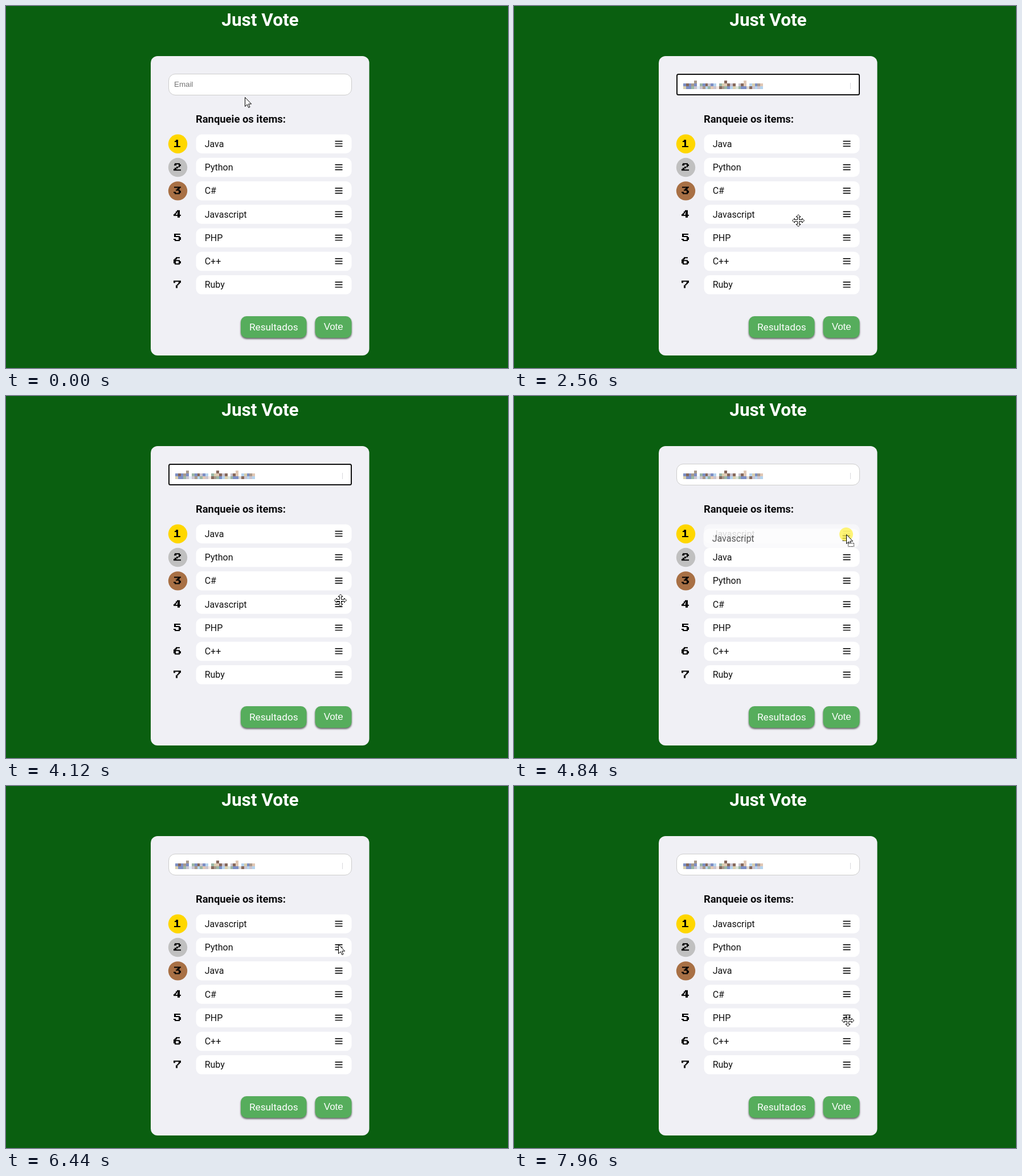
An HTML page for the animation above (8000 ms loop, 881 px wide and 636 px high).

```html
<!DOCTYPE html>
<html lang="pt">
<head>
<meta charset="utf-8">
<title>Just Vote</title>
<style>
html, body { margin: 0; width: 100%; height: 100%; overflow: hidden; background: #0a5f10; }
svg { display: block; position: absolute; left: 0; top: 0; font-family: Roboto, sans-serif; }
.arial { font-family: "Liberation Sans", sans-serif; }
.btn { fill: #56ad5c; filter: drop-shadow(0 2px 1.5px rgba(0,0,0,.6)); }
.sharp { shape-rendering: crispEdges; }
.pointer path { fill: #fff; stroke: #000; stroke-width: 1; }
</style>
</head>
<body>
<svg id="stage" width="881" height="636" viewBox="0 0 881 636">
  <text x="446" y="34.5" font-size="31.5" font-weight="700" fill="#fff" text-anchor="middle">Just Vote</text>
  <rect x="254" y="88" width="383.5" height="526" rx="12" fill="#f0f0f5"/>
  <rect id="field" fill="#fff"/>
  <text id="hint" class="arial" x="295" y="142" font-size="13.33" fill="#757575">Email</text>
  <rect id="caret" class="sharp" x="295" y="130" width="1" height="15"/>
  <g id="mosaic" class="sharp"></g>
  <text x="333" y="205" font-size="18.4" font-weight="700" fill="#0b0b0d">Ranqueie os items:</text>
  <g id="ranks"></g>
  <g id="rows"></g>
  <rect class="btn" x="412" y="545" width="115.5" height="38" rx="10"/>
  <text x="469.8" y="570" font-size="17.2" fill="#fff" text-anchor="middle">Resultados</text>
  <rect class="btn" x="542.5" y="545" width="64" height="38" rx="10"/>
  <text class="arial" x="574.8" y="569" font-size="17" fill="#fff" text-anchor="middle">Vote</text>
  <g id="ghost"></g>
  <circle id="press" r="12" fill="#fff02e" fill-opacity=".65"/>
  <g class="pointer">
    <path id="arrow" d="M.5 .5v16l3.7-3.5 2.5 5.5 2.3-1-2.4-5.4h5z"/>
    <path id="beam" d="M-3 -7.5h2.5l.5 .5 .5-.5h2.5M0-7V7M-3 7.5h2.5l.5-.5 .5 .5h2.5" style="fill:none"/>
    <path id="move" d="M0-10.5l4 4H1.5v5h5V-4l4 4-4 4V1.5h-5v5H4l-4 4-4-4h2.5v-5h-5V4l-4-4 4-4v2.5h5v-5H-4z"/>
    <path id="drop" d="M3.5 15.5h10v6h-10z" stroke-dasharray="1.5 1"/>
  </g>
</svg>
<script>
const LOOP = 8000, TOP = 242.3, PITCH = 41.27;
const $ = id => document.getElementById(id);
const names = ["Java", "Python", "C#", "Javascript", "PHP", "C++", "Ruby"];
const medals = ["#ffd700", "#c0c0c0", "#a87045"];
const digits = [
  "M2 2h2V0h4v11h4v2H1v-2h4V4H2z",
  "M2 0h9v2h2v3h-2v2h-3v2h-3v2h8v2H0v-3h2v-2h3v-2h4V2H5v2H1V2h1z",
  "M1 0h12v2h-2v2h-2v1h2v2h2v4h-2v2H2v-2H0V9h4v2h5V7H4V5h2V3h2V2H1z",
  "M6 0h5v8h2v2h-2v3H7v-3H0V7h2V5h2V2h2zM7 3v5H4V6h2V3z",
  "M1 0h11v2H4v2h7v2h2v5h-2v2H2v-2H0V9h4v2h5V6H1z",
  "M4 0h7v2H6v2H4v1h7v2h2v4h-2v2H2v-2H0V4h2V2h2zM4 7v4h5V7z",
  "M0 0h13v4h-2v2h-2v2h-2v5H4V8h2V6h2V4h1V2H3v2H0z"
];

// time, x, y, pointer shape from that time on
const path = [
  [0, 419, 160, "arrow"], [40, 419, 160, "arrow"], [240, 402, 153, "beam"], [440, 379, 144, "beam"],
  [1920, 379, 144, "beam"], [2120, 398, 190, "arrow"], [2240, 420, 260, "move"], [2480, 475, 421, "move"],
  [2720, 548, 290, "move"], [3200, 583, 283, "move"], [3400, 583, 283, "move"], [3800, 593, 345, "move"],
  [4120, 587, 359, "move"], [4240, 584, 359, "move"], [4320, 584, 359, "drop"], [4760, 583, 243, "drop"],
  [5040, 583, 243, "arrow"], [5200, 589, 262, "move"], [5360, 591, 290, "move"], [5600, 583, 322, "move"],
  [6040, 583, 322, "drop"], [6320, 583, 278, "drop"], [6400, 583, 278, "arrow"], [6480, 583, 278, "arrow"],
  [6840, 580, 334, "arrow"], [7000, 580, 345, "arrow"], [7200, 580, 345, "arrow"], [7320, 583, 368, "move"],
  [7600, 588, 439, "move"], [7960, 586, 412, "move"], [8000, 586, 412, "move"]
];
const presses = [[320, 440], [4280, 5040], [5760, 6400]];
const drags = [
  { item: "Javascript", from: 3, start: 4320, end: 5040, x: 584, y: 359 },
  { item: "Python", from: 2, start: 6080, end: 6400, x: 583, y: 322 }
];
const blinks = [[400, 920], [1480, 1800], [1960, 2400], [2860, 3440]];

const within = (t, spans) => spans.some(([a, b]) => t >= a && t < b);
const show = (node, on) => node.style.display = on ? "" : "none";
const place = (node, x, y) => node.setAttribute("transform", `translate(${x} ${y})`);
const slotY = i => TOP + i * PITCH;

function add(parent, tag, attrs, text) {
  const node = document.createElementNS("http://www.w3.org/2000/svg", tag);
  for (const k in attrs) node.setAttribute(k, attrs[k]);
  if (text) node.textContent = text;
  return parent.appendChild(node);
}

function makeRow(parent, name) {
  const g = add(parent, "g", {});
  add(g, "rect", { x: 333.5, y: -16.8, width: 273, height: 33.5, rx: 10, fill: "#fff" });
  add(g, "text", { x: 348.7, y: 5.5, "font-size": 16, fill: "#111" }, name);
  add(g, "path", { d: "M577.5-4.7h13M577.5-.3h13M577.5 4.1h13", stroke: "#111", "stroke-width": 1.7 });
  return g;
}

function makeMosaic() {
  const tints = ["#b5d3ee", "#a99a8c", "#d9cfae", "#7d8fc4", "#c9c3cf", "#9bb7a6", "#86695c", "#e0c7b4"];
  const tall = [4, 15, 22], gaps = [5, 12, 19, 23];
  const w = 4.83;
  let seed = 11;
  const rnd = () => (seed = seed * 16807 % 2147483647) / 2147483647;
  for (let c = 0; c < 29; c++) for (let r = 0; r < 3; r++) {
    const fill = tints[Math.floor(rnd() * tints.length)];
    const empty = r ? gaps.includes(c) && r === 1 : !tall.includes(c);
    if (!empty) add($("mosaic"), "rect", { x: 297 + c * w, y: 131 + r * 5, width: w, height: 5, fill, opacity: gaps.includes(c) ? .4 : 1 });
  }
  add($("mosaic"), "rect", { x: 590, y: 135, width: 1, height: 11, fill: "#d8d8dc" });
}

digits.forEach((d, i) => {
  const g = add($("ranks"), "g", {});
  place(g, 301.5, slotY(i));
  if (medals[i]) add(g, "circle", { r: 16.7, fill: medals[i] });
  add(g, "path", { d, transform: "translate(-7.5 -7.3)", "fill-rule": "evenodd" });
});
const rows = {}, ghosts = {};
names.forEach(n => rows[n] = makeRow($("rows"), n));
drags.forEach(d => {
  ghosts[d.item] = makeRow($("ghost"), d.item);
  ghosts[d.item].setAttribute("opacity", .7);
});
makeMosaic();

function pointerAt(t) {
  let i = path.length - 2;
  while (path[i][0] > t) i--;
  const [t0, x0, y0, kind] = path[i], [t1, x1, y1] = path[i + 1];
  const k = (t - t0) / (t1 - t0);
  return { x: x0 + (x1 - x0) * k, y: y0 + (y1 - y0) * k, kind };
}

function drawField(t) {
  const focus = t >= 400 && t < 4280, filled = t >= 1800;
  const box = focus
    ? { x: 286, y: 120, width: 320, height: 36, rx: 2.5, stroke: "#101010", "stroke-width": 2 }
    : { x: 285.5, y: 119.5, width: 321, height: 37, rx: 11.5, stroke: "#ccc", "stroke-width": 1 };
  for (const k in box) $("field").setAttribute(k, box[k]);
  show($("hint"), !filled);
  show($("mosaic"), filled);
  show($("caret"), within(t, blinks));
  $("caret").setAttribute("x", filled ? 433 : 295);
  $("caret").setAttribute("height", filled ? 1 : 15);
}

function drawList(t, p) {
  const order = names.slice();
  for (const d of drags) {
    const active = t >= d.start && t < d.end;
    if (t >= d.start) {
      const y = active ? p.y : pointerAt(d.end - 1).y;
      const to = Math.min(d.from, Math.max(0, Math.round((y - TOP) / PITCH)));
      order.splice(order.indexOf(d.item), 1);
      order.splice(to, 0, d.item);
    }
    show(ghosts[d.item], active);
    place(ghosts[d.item], p.x - d.x, slotY(d.from) + p.y - d.y);
    rows[d.item].setAttribute("opacity", active ? .5 : 1);
  }
  order.forEach((n, i) => place(rows[n], 0, slotY(i)));
}

function drawPointer(t, p) {
  const x = Math.round(p.x), y = Math.round(p.y);
  for (const id of ["arrow", "beam", "move", "drop"]) {
    show($(id), id === p.kind || (id === "arrow" && p.kind === "drop"));
    place($(id), x, y);
  }
  show($("press"), within(t, presses));
  place($("press"), x, y);
}

function render(now) {
  const t = Math.floor(now % LOOP / 40) * 40;
  const p = pointerAt(t);
  drawField(t);
  drawList(t, p);
  drawPointer(t, p);
}

const begin = performance.now();
function tick() {
  render(performance.now() - begin);
  requestAnimationFrame(tick);
}
tick();
</script>
</body>
</html>
```
